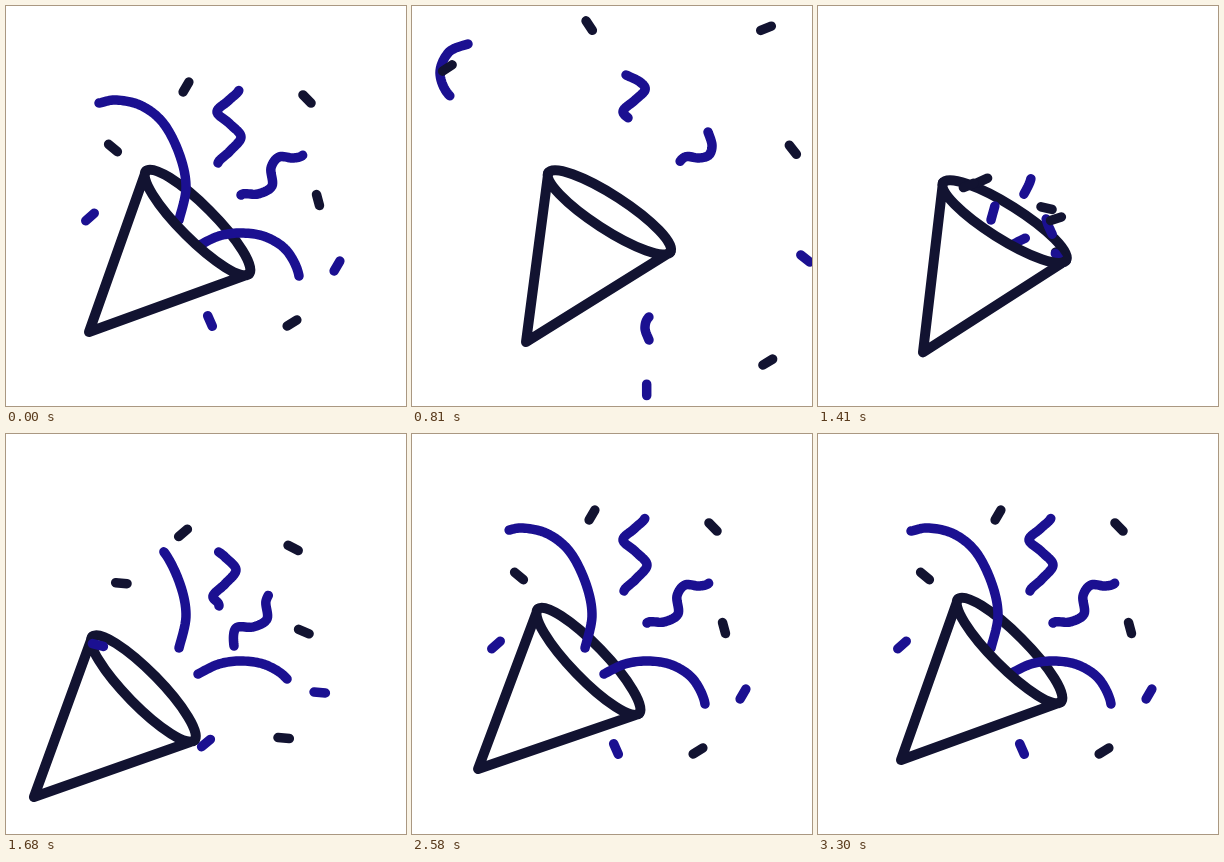
Animation of 400x400 px, one loop 3330 ms. Source, as an HTML page with a canvas:

```html
<!DOCTYPE html>
<html lang="en">
<head>
<meta charset="utf-8">
<title>Party popper</title>
<style>
html, body { margin: 0; width: 100%; height: 100%; overflow: hidden; background: #fff; }
canvas { display: block; width: 400px; height: 400px; }
</style>
</head>
<body>
<canvas id="stage" width="400" height="400"></canvas>
<script>
const ctx = document.getElementById('stage').getContext('2d');
const LOOP = 3330, RELOAD = 1250;
const DARK = '#121331', BLUE = '#1b1091';
const mix = (a, b, k) => a + (b - a) * k;

// Smooth monotone interpolation through [time, value] keys, at rest on both ends.
function track(t, keys) {
  const last = keys.length - 1;
  if (t <= keys[0][0]) return keys[0][1];
  if (t >= keys[last][0]) return keys[last][1];
  let i = 0;
  while (t >= keys[i + 1][0]) i++;
  const slope = n => (keys[n + 1][1] - keys[n][1]) / (keys[n + 1][0] - keys[n][0]);
  const tangent = n => {
    if (n === 0 || n === last) return 0;
    const p = slope(n - 1), q = slope(n);
    return p * q <= 0 ? 0 : 2 * p * q / (p + q);
  };
  const [t0, v0] = keys[i], [t1, v1] = keys[i + 1];
  const d = t1 - t0, u = (t - t0) / d, w = 1 - u;
  return v0 * (1 + 2 * u) * w * w + tangent(i) * d * u * w * w
       + v1 * u * u * (3 - 2 * u) - tangent(i + 1) * d * u * u * w;
}

// Point on a Catmull-Rom spline; u counts control points.
function splinePoint(points, u) {
  const last = points.length - 1;
  const i = Math.min(Math.floor(u), last - 1), k = u - i;
  const at = n => points[Math.max(0, Math.min(last, n))];
  const [p0, p1, p2, p3] = [at(i - 1), at(i), at(i + 1), at(i + 2)];
  return [0, 1].map(c => p1[c] + k / 2 * (p2[c] - p0[c]
    + k * (2 * p0[c] - 5 * p1[c] + 4 * p2[c] - p3[c]
    + k * (3 * (p1[c] - p2[c]) + p3[c] - p0[c]))));
}

function pen(color, width) {
  ctx.strokeStyle = color;
  ctx.lineWidth = width;
  ctx.lineCap = ctx.lineJoin = 'round';
}

const squiggleMotion = {
  out: { from: [[0, 2], [810, 5.5], [1180, 10]], to: [[0, 7.95], [500, 10]] },
  burst: { from: [[1300, 0], [1680, 1], [2190, 2]],
           to: [[1300, 0], [1680, 5.4], [2190, 7.85], [2500, 7.95]] },
  drift: 5
};
const streamers = [
  { points: [[173, 214], [180, 182], [174, 150], [158, 118], [136, 100], [111, 94], [93, 97],
             [65, 103], [38, 90], [28, 67], [37, 46], [56, 38]],
    out: { from: [[0, 0], [810, 8], [1200, 11]], to: [[0, 6], [500, 11]] },
    burst: { from: [[0, 0]], to: [[1300, 0], [1680, 3], [2190, 5], [2580, 5.8], [3300, 6]] },
    drift: 0 },
  { points: [[192, 240], [213, 230], [236, 227], [260, 231], [281, 245], [293, 270], [288, 291],
             [270, 302], [252, 304], [237, 311], [233, 322], [237, 334]],
    out: { from: [[0, 0], [810, 9], [1050, 11]], to: [[0, 5], [500, 11]] },
    burst: { from: [[0, 0]], to: [[1300, 0], [1680, 4], [2190, 4.87], [2580, 5]] },
    drift: 0 },
  { points: [[210, 185], [218, 167], [212, 157], [224, 145], [235, 131], [224, 118], [211, 106],
             [222, 95], [233, 84], [228, 76], [214, 69]],
    ...squiggleMotion },
  { points: [[240, 225], [233, 207], [235, 189], [252, 188], [266, 180], [265, 162], [273, 151],
             [287, 152], [297, 149], [300, 139], [296, 126]],
    ...squiggleMotion }
];

function drawStreamer(s, t) {
  const phase = t < RELOAD ? s.out : s.burst;
  const from = track(t, phase.from), to = track(t, phase.to);
  if (to - from < 0.02) return;
  const shift = t < RELOAD ? 0 : s.drift * track(t, [[1680, 1], [2190, 0]]);
  const steps = Math.ceil((to - from) * 10);
  pen(BLUE, 9.5);
  ctx.beginPath();
  for (let i = 0; i <= steps; i++) {
    const [x, y] = splinePoint(s.points, mix(from, to, i / steps));
    ctx.lineTo(x - shift, y + shift);
  }
  ctx.stroke();
}

// Poses are [x, y, degrees]: inside the cone, at rest, and flown off.
const pieces = [
  { color: DARK, cone: [160, 201, -20], rest: [180, 81, -60], away: [177, 15, 140], reload: 1260 },
  { color: DARK, cone: [208, 233, 9], rest: [301, 93, 45], away: [358, 17, -70], reload: 1260 },
  { color: DARK, cone: [163, 190, -30], rest: [107, 142, 40], away: [30, 56, -86], reload: 1110 },
  { color: DARK, cone: [217, 218, -30], rest: [312, 194, 75], away: [386, 140, 35], reload: 1080 },
  { color: DARK, cone: [230, 230, 42], rest: [286, 317, -32], away: [361, 359, 278], reload: 1080 },
  { color: BLUE, cone: [137, 211, 72], rest: [84, 211, -42], away: [-17, 225, 100], reload: 1080, front: true },
  { color: BLUE, cone: [215, 250, 70], rest: [331, 260, -60], away: [398, 252, 109], reload: 1080 },
  { color: BLUE, cone: [177, 275, -146], rest: [204, 315, 66], away: [237, 389, 107], reload: 1110 }
];

function drawPiece(p, t) {
  let a, b, move, spin;
  if (t < p.reload) {
    [a, b] = [p.rest, p.away];
    move = track(t, [[0, 0], [120, 0.18], [540, 0.77], [810, 0.93], [1230, 1]]);
    spin = Math.min(1, t / 1230) ** 1.3;
  } else {
    [a, b] = [p.cone, p.rest];
    move = track(t, [[1260, 0], [1680, 0.85], [1900, 0.97], [2190, 1]]);
    spin = track(t, [[1260, 0], [1680, 0.5], [2190, 0.93], [2500, 1]]);
  }
  const x = mix(a[0], b[0], move), y = mix(a[1], b[1], move);
  const angle = mix(a[2], b[2], spin) * Math.PI / 180;
  const dx = 5.7 * Math.cos(angle), dy = 5.7 * Math.sin(angle);
  pen(p.color, 9.5);
  ctx.beginPath();
  ctx.moveTo(x - dx, y - dy);
  ctx.lineTo(x + dx, y + dy);
  ctx.stroke();
}

const apexX = [[0, 83], [810, 114], [1230, 118], [1320, 118], [1680, 28], [1790, 23],
               [2190, 42], [2580, 66], [2700, 70.5], [3300, 83]];
const apexY = [[0, 326], [810, 336], [1230, 342], [1320, 343], [1680, 363], [1790, 367],
               [2190, 347], [2580, 335], [3300, 326]];
const tilt = [[0, 0], [810, -12], [1230, -15], [1320, -15], [1680, 0.5], [2050, 4],
              [2190, 3.8], [2580, 1], [3300, 0]];

// Runs draw in coordinates whose origin is the apex of the cone.
function inCone(t, draw) {
  ctx.save();
  ctx.translate(track(t, apexX), track(t, apexY));
  ctx.rotate(track(t, tilt) * Math.PI / 180);
  pen(DARK, 10);
  ctx.beginPath();
  draw();
  ctx.stroke();
  ctx.restore();
}

const lip = (end, reverse) =>
  ctx.ellipse(108.5, -109.5, 72.8, 17, Math.PI / 4, Math.PI, end, reverse);

function coneFront() {
  ctx.moveTo(0, 0);
  lip(0, true);
  ctx.closePath();
  ctx.fillStyle = '#fff';
  ctx.fill();
}

function render(t) {
  const isFront = p => p.front && t > 1640;
  ctx.fillStyle = '#fff';
  ctx.fillRect(0, 0, 400, 400);
  inCone(t, () => lip(2 * Math.PI, false));
  streamers.forEach(s => drawStreamer(s, t));
  pieces.filter(p => !isFront(p)).forEach(p => drawPiece(p, t));
  inCone(t, coneFront);
  pieces.filter(isFront).forEach(p => drawPiece(p, t));
}

function frame() {
  render(performance.now() % LOOP);
  requestAnimationFrame(frame);
}
frame();
</script>
</body>
</html>
```
